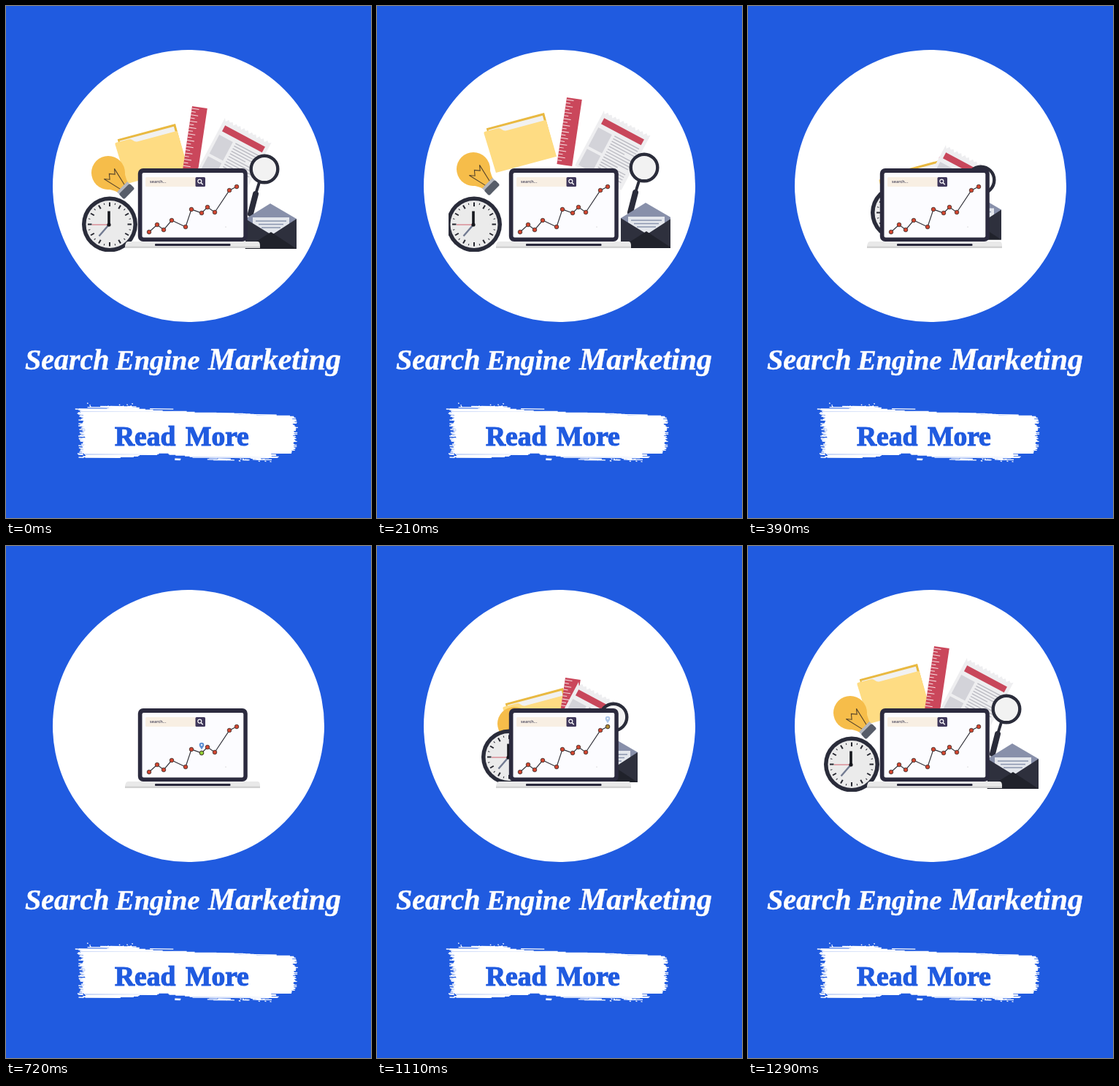
These frames come from a looping animation (500 by 700 pixels, 1.65 s). An HTML page:

```html
<!DOCTYPE html>
<html lang="en">
<head>
<meta charset="utf-8">
<title>Search Engine Marketing</title>
<style>
  html, body { margin: 0; height: 100%; overflow: hidden; background: #205be0; }
  svg { display: block; width: 100vw; height: 100vh; }
  .title { font: italic bold 40px "Liberation Serif", "Times New Roman", serif; fill: #fff; stroke: #fff; stroke-width: .5; }
  .cta { font: bold 37.5px "Liberation Serif", "Times New Roman", serif; fill: #205be0; stroke: #205be0; stroke-width: 1.2; }
  .query { font: 600 5.6px "Open Sans", sans-serif; fill: #45435a; }
</style>
</head>
<body>
<svg viewBox="0 0 500 700" xmlns="http://www.w3.org/2000/svg">
  <defs><clipPath id="crop"><rect x="98" y="125" width="304" height="211"/></clipPath></defs>
  <rect width="500" height="700" fill="#205be0"/>
  <circle cx="250" cy="246" r="186" fill="#fff"/>

  <g clip-path="url(#crop)">
    <g id="folder"><g transform="translate(232 161) rotate(-15)">
      <path d="M-82 0H0V58H-82Z" fill="#e9b941"/>
      <path d="M-80 3H-3V24H-80Z" fill="#f1f1f1"/>
      <path d="M-87 6Q-87 4 -85 4H-67Q-64 4 -62 7T-57 10H-2Q0 10 0 12L1 62H-85Z" fill="#fedc83"/>
    </g></g>

    <g id="ruler"><g transform="translate(255 137) rotate(8.5)">
      <rect width="21" height="92" fill="#ca475b"/>
      <path id="ticks" stroke="#f6dfe2" stroke-width="1"/>
    </g></g>

    <g id="paper"><g transform="translate(300 153) rotate(28)">
      <path id="sheet" fill="#eeeef0"/>
      <rect x="5" y="9" width="62" height="9" fill="#c8475b"/>
      <path d="M4 24H25V53H4ZM4 57H25V82H4Z" fill="#d3d3d9"/>
      <path id="print" stroke="#b9b9c1" stroke-width="1.3"/>
    </g></g>

    <g id="bulb"><g transform="translate(140 228) rotate(-45)">
      <path d="M-20.5 10Q-12 20 -9.5 29H9.5Q12 20 20.5 10Z" fill="#f6bd4a"/>
      <circle r="23" fill="#f6bd4a"/>
      <path d="M-4 28L-10 2L-5 8L0 2L5 8L10 2L4 28" fill="none" stroke="#57452b" stroke-width="1.1"/>
      <rect x="-10" y="27" width="20" height="5" fill="#b4b7bf"/>
      <rect x="-10.500" y="31" width="21" height="10" rx="2.500" fill="#575d69"/>
    </g></g>

    <g id="clock"><g transform="translate(142 298.500)">
      <circle r="38" fill="#2a2c3a"/>
      <circle r="32.500" fill="#ebebeb"/>
      <g id="hours" stroke="#25262f" stroke-width="1.800"></g>
      <path d="M-1 .5H-24" stroke="#d0606c" stroke-width="1"/>
      <path d="M-1 .5L-14.500 16" stroke="#717a91" stroke-width="2.400"/>
      <path d="M-1 1V-18" stroke="#16171d" stroke-width="3.600"/>
      <circle cx="-1" cy=".5" r="2.600" fill="#16171d"/>
    </g></g>

    <g id="lens">
      <path d="M347 241L342 257" stroke="#2a2c3a" stroke-width="4"/>
      <path d="M342 257L335 284" stroke="#2a2c3a" stroke-width="8" stroke-linecap="round"/>
      <circle cx="354" cy="223" r="18.300" fill="#f2f2f2" stroke="#2a2c3a" stroke-width="4.400"/>
    </g>

    <g id="mail">
      <path d="M328 291L362 270L398 291V312H328Z" fill="#8890aa"/>
      <path d="M338 289H388V314H338Z" fill="#e3e6ec"/>
      <path d="M342 294H384M346 298.500H380M350 303H376" stroke="#8b95ae" stroke-width="1.500"/>
      <path d="M328 291L364 313L398 291V332H328Z" fill="#2e303d"/>
      <path d="M327 332L363 309L398 332Z" fill="#20222b"/>
    </g>
  </g>

  <g id="laptop">
    <rect x="180.800" y="222" width="150" height="100" rx="7" fill="#2b2a3e"/>
    <rect x="186.500" y="228" width="138.800" height="88.500" rx="2" fill="#fcfcff"/>
    <path d="M167 322H345Q348 322 348 328V331H163V328Q164 322 167 322Z" fill="#e9e9e9"/>
    <rect x="163" y="328.500" width="185" height="2.500" fill="#d2d2d2"/>
    <rect x="204" y="325" width="103.500" height="3" rx="1" fill="#2b2a3e"/>
    <rect x="191" y="234" width="70" height="13" rx="1.500" fill="#f8efe3"/>
    <rect x="259.500" y="234" width="13.500" height="13" rx="1.500" fill="#3f375b"/>
    <circle cx="265.300" cy="239.600" r="2.500" fill="none" stroke="#fff" stroke-width="1.200"/>
    <path d="M267.200 241.500L269.700 244.200" stroke="#fff" stroke-width="1.400"/>
    <text class="query" x="197" y="242">search...</text>
    <circle cx="301" cy="302" r=".5" fill="#aaa"/>
    <polyline id="trend" fill="none" stroke="#34343c" stroke-width="1.200"/>
    <g id="dots" stroke="#3a3030" stroke-width=".8"></g>
    <g id="pins"></g>
  </g>

  <text class="title" x="26" y="497">Search</text>
  <text class="title" x="150" y="497" style="font-size:38.500px">Engine</text>
  <text class="title" x="277" y="497" style="font-size:42px">Marketing</text>

  <path id="brush" stroke="#fff" stroke-width="1.300" fill="none"/>
  <text class="cta" x="149" y="600.500">Read</text>
  <text class="cta" x="246" y="600.500">More</text>
</svg>

<script>
const LOOP = 1650, STEP = 30;
const $ = id => document.getElementById(id);
const lerp = (a, b, k) => a + (b - a) * k;
const clamp = v => Math.max(0, Math.min(1, v));
const range = (n, fn) => Array.from({ length: n }, (_, i) => fn(i));

let seed = 11;
const rnd = () => (seed = seed * 16807 % 2147483647) / 2147483647;

// Repeated details
$('ticks').setAttribute('d', range(20, i => `M0 ${3 + i * 4.4}h${i % 2 ? 6 : 10}`).join(''));
$('print').setAttribute('d', range(14, i => `M29 ${24 + i * 4}h${i % 5 == 4 ? 24 : 38}`).join(''));
$('sheet').setAttribute('d', 'M0 0' + range(12, i => `L${i * 6 + 3} ${i % 2 ? 2.5 : 4}L${i * 6 + 6} 0`).join('') + 'V85H0Z');
$('hours').innerHTML = range(24, i =>
  `<path d="M0 ${i % 2 ? -27.5 : -24.5}V-30" stroke-width="${i % 2 ? 1 : 2}" transform="rotate(${i * 15})"/>`).join('');

// Chart
const chart = [[196, 309], [207, 299], [216, 306], [227, 293], [246, 302], [254, 278],
  [268, 283], [276, 275], [286, 282], [306, 252], [316, 247]];
$('trend').setAttribute('points', chart.join(' '));
$('dots').innerHTML = chart.map(([x, y]) => `<circle cx="${x}" cy="${y}" r="2.8" fill="#d1452f"/>`).join('');

// [chart point, time of full strength]
const stops = [[1, 480], [3, 600], [6, 720], [8, 885], [10, 1050]];
$('pins').innerHTML = stops.map(([i]) => `<g transform="translate(${chart[i]})">
  <circle r="2.8" fill="#93d035" stroke="#3a3030" stroke-width=".8"/>
  <path d="M0 -4.500C-1 -7 -3.300 -8.500 -3.300 -11A3.300 3.300 0 0 1 3.300 -11C3.300 -8.500 1 -7 0 -4.500Z" fill="#5c8fd3"/>
  <circle cy="-11" r="1.300" fill="#dfeaf8"/></g>`).join('');

// Button: horizontal strokes with ragged ends
function paintBrush() {
  let d = '';
  const dash = (x1, x2, y) => { d += `M${x1.toFixed(1)} ${y.toFixed(1)}L${x2.toFixed(1)} ${(y + .4).toFixed(1)}`; };
  for (let y = 551; y < 618; y++) {
    const k = (y - 585) / 33;
    const left = 106 - 4 * k * k + rnd() * 5 - 2;
    let right = 396 - 16 * k * k * k * k + rnd() * 7 - 3;
    if (y < 562) right = Math.min(right, 120 + (y - 549) * 22 + rnd() * 30);
    if (y > 611) {
      dash(left + 4, lerp(210, 150, (y - 611) / 6) + rnd() * 20, y);
      dash(200 + (y - 611) * 8 + rnd() * 15, 375 - rnd() * 14, y);
    } else dash(left, right, y);
    if (rnd() < .5) dash(left - 5, left + 2, y);
  }
  range(14, i => {
    const x = 108 + rnd() * 90;
    dash(x, x + 8 + rnd() * 35, 547 + rnd() * 4);
    const u = 215 + rnd() * 130;
    dash(u, u + 5 + rnd() * 25, 617 + rnd() * 4);
    const v = 240 + rnd() * 120;
    dash(v, v + 10 + rnd() * 20, 555 + (v - 240) / 28);
  });
  range(12, () => {
    const x = 110 + rnd() * 65, u = 300 + rnd() * 70;
    dash(x, x + 1.5, 543 + rnd() * 5);
    dash(u, u + 2, 619 + rnd() * 4);
  });
  $('brush').setAttribute('d', d);
}
paintBrush();

// Shifts from the rest pose at the outward times, then one on the way back
const OUT = [0, 120, 210, 300, 390], BACK = 1110, REST = 1290;
const moves = {
  folder: { out: [[0, 0], [-3, -9], [-3, -15], [-1, -16], [30, 50]], back: [23, 33] },
  ruler: { out: [[0, 0], [2, -7], [5, -12], [6, -6], [7, 69]], back: [3, 43] },
  paper: { out: [[0, 0], [8, -6], [11, -10], [13, -11], [-29, 37]], back: [-24, 33] },
  bulb: { out: [[0, 0], [-7, -3], [-8, -5], [-5, -3], [64, 22]], back: [48, 15] },
  clock: { out: [[0, 0], [-7, 1], [-9, 0], [-6, 0], [64, -16]], back: [39, -10] },
  lens: { out: [[0, 0], [8, -2], [12, -2], [13, -1], [-35, 15]], back: [-30, 11] },
  mail: { out: [[0, 0], [4, .5], [6, -1], [3, -1.5], [-51, -12.5]], back: [-41, -9] }
};

function shift({ out, back }, t) {
  if (t >= REST) return [0, 0];
  if (t >= 900) {
    const k = (REST - t) / (REST - BACK);
    return back.map(v => v * k);
  }
  let i = 0;
  while (i < OUT.length - 2 && t > OUT[i + 1]) i++;
  const k = (t - OUT[i]) / (OUT[i + 1] - OUT[i]);
  return out[i].map((v, n) => lerp(v, out[i + 1][n], k));
}

function draw(t) {
  const hidden = t >= 450 && t < 900;
  for (const id in moves) {
    const el = $(id);
    el.style.display = hidden ? 'none' : '';
    el.setAttribute('transform', `translate(${shift(moves[id], t)})`);
  }
  stops.forEach(([, at], i) =>
    $('pins').children[i].setAttribute('opacity', clamp(1.5 - Math.abs(t - at) / 60)));
}

const start = performance.now();
function tick() {
  const t = (performance.now() - start) % LOOP;
  draw(Math.floor(t / STEP) * STEP);
  requestAnimationFrame(tick);
}
tick();
</script>
</body>
</html>
```
